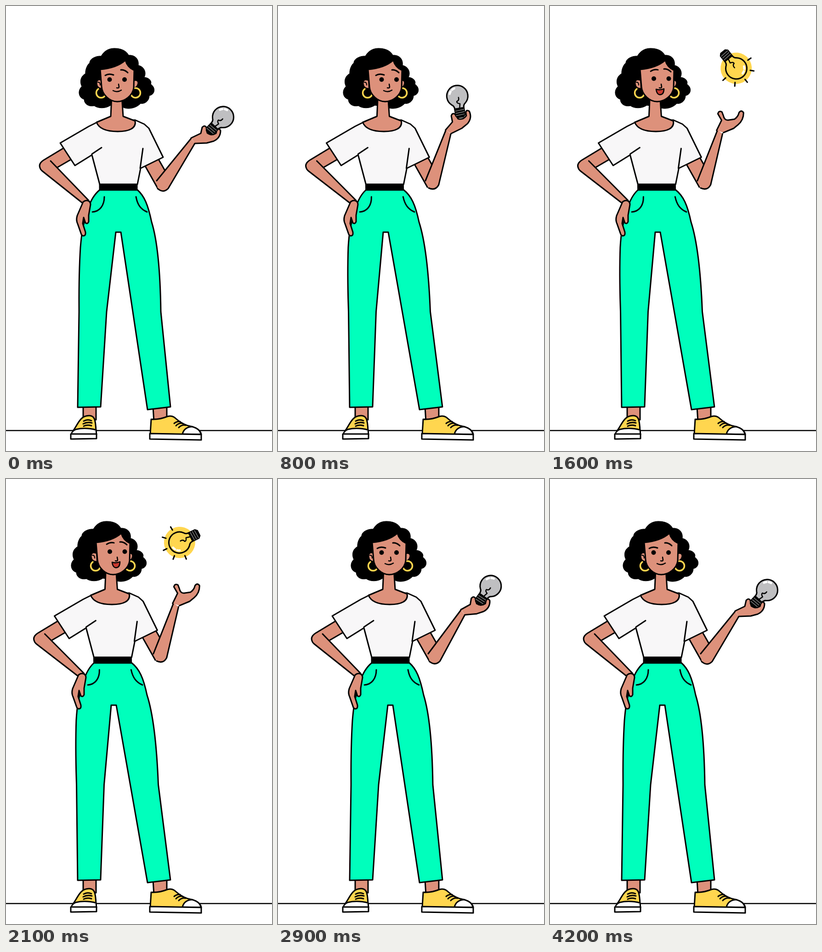
Animation, 579 px wide and 968 px high, one loop 4.3 s. Source, as an HTML page with a canvas:

```html
<!DOCTYPE html>
<html lang="en">
<head>
<meta charset="utf-8">
<title>Bulb toss</title>
<style>
html, body { margin: 0; width: 100%; height: 100%; overflow: hidden; background: #fff; }
canvas { display: block; width: 579px; height: 968px; }
</style>
</head>
<body>
<canvas id="stage" width="579" height="968"></canvas>
<script>
const ctx = document.getElementById('stage').getContext('2d');
const LOOP = 4300, STEP = 100;
const INK = '#000', SKIN = '#dd917b', GREEN = '#00ffbc', YELLOW = '#ffd64f',
      SHIRT = '#f8f7f8', GREY = '#bfbfc1', RED = '#c8392f';
const PEAK = 1800, HANG = 600;

const rad = deg => deg * Math.PI / 180;
const unit = (v, a, b) => Math.min(1, Math.max(0, (v - a) / (b - a)));
const smooth = (v, a, b) => { const u = unit(v, a, b); return u * u * (3 - 2 * u); };
const bump = (v, a, b) => Math.sin(Math.PI * unit(v, a, b));
// Quick start, long soft landing
const settle = (t, start) => 1 - (1 - unit(t, start, start + 1200) ** 2) ** 7;

// How far a height on the body sways and lifts; the feet stay put
const shift = y => 10 * unit(y, 875, 492) + 2.6 * smooth(y, 425, 395);
const lift = y => 6 * unit(y, 885, 690);

function pen(d, fill, line = INK, width = 3) {
  const path = new Path2D(d);
  if (fill) { ctx.fillStyle = fill; ctx.fill(path); }
  if (line) { ctx.strokeStyle = line; ctx.lineWidth = width; ctx.stroke(path); }
}
function at(x, y, deg, draw) {
  ctx.save();
  ctx.translate(x, y);
  ctx.rotate(rad(deg));
  draw();
  ctx.restore();
}
function arc(x, y, r, from, to, line, width) {
  ctx.beginPath();
  ctx.arc(x, y, r, rad(from), rad(to));
  ctx.strokeStyle = line;
  ctx.lineWidth = width;
  ctx.stroke();
}
function oval(x, y, rx, ry, fill) {
  ctx.beginPath();
  ctx.ellipse(x, y, rx, ry, 0, 0, 7);
  ctx.fillStyle = fill;
  ctx.fill();
}

function shoes() {
  pen('M0,923.5 L579,923.5', null, INK, 2.5);
  pen('M168,868 L168,900 L196,900 L196,868', SKIN);
  pen('M320,872 L322,905 L350,900 L350,870', SKIN);

  pen('M146,924 C156,912 160,891 181,891 C193,891 195,900 196,925', YELLOW);
  pen('M142,932 Q143,925 152,921 Q172,916 196,922 L197,932 Z', '#fff');
  pen('M141,931 L197,931 L197,941 L141,942 Z', '#fff');
  pen('M169,903 Q177,898 186,902 M168,909 Q177,904 187,907 M169,914 Q177,910 186,913');

  pen('M314,931 L316,899 Q334,900 351,893 Q361,890 368,896 Q385,912 405,915 Q424,922 425,932 Z', YELLOW);
  pen('M384,931 Q388,916 405,915 Q423,920 424,932 Z', '#fff');
  pen('M313,930 L425,932 L425,944 L313,942 Z', '#fff');
  pen('M366,908 Q372,903 379,904 M370,913 Q377,906 385,908 M376,917 Q383,910 391,912');
}

function bulb(lit) {
  if (lit) {
    oval(0, -37, 34, 34, YELLOW);
    for (let k = -2; k <= 2; k++) {
      at(0, -37, k * 43, () => pen('M0,-31 L0,-39'));
    }
  }
  pen('M-10,-10 Q-10,-17 -15,-20 A23,23 0 1 1 15,-20 Q10,-17 10,-10 Z', lit ? YELLOW : GREY);
  pen('M1,-11 L3,-20 Q-4,-22 -3,-26 Q3,-27 2,-34', null, INK, 2.5);
  for (const from of [202, 238]) arc(0, -38, 17, from, from + 19, '#fff', 4.5);
  pen('M-10,-10 L10,-10 L10,5 L6,9 L-6,9 L-10,5 Z', INK);
  for (const y of [-6, -1, 4]) pen(`M-9,${y + .5} L9,${y - .5}`, null, '#777', 1.7);
}

function hair(s, hop) {
  ctx.save();
  ctx.translate(241 - 17 * s, -10 * hop);
  ctx.scale(1 - .08 * Math.max(0, hop), 1);
  ctx.translate(-241, 0);
  pen('M207,109 C214,97 224,92 236,92 C250,92 262,97 267,107 C282,106 290,117 288,129 ' +
    'C302,132 306,146 301,155 C313,156 318,165 315,170 C327,178 324,193 312,195 ' +
    'C312,207 301,214 293,212 C283,223 264,226 254,220 L228,216 C216,224 200,223 192,217 ' +
    'C180,220 170,213 170,203 C158,200 155,184 165,175 C160,165 162,153 173,147 ' +
    'C172,138 178,126 182,124 C182,114 197,108 207,109 Z', INK, INK, 1);
  ctx.restore();
}

function face(s, hop, joy) {
  ctx.save();
  ctx.translate(0, -8 * hop);

  at(-12 * s, 0, 0, () => {
    pen('M208,161 Q197,157 197,169 Q198,180 209,180', SKIN);
    pen('M200,166 Q205,165 205,172', null, INK, 2);
    pen('M277,162 Q288,159 288,168 Q286,178 277,179', SKIN);
    arc(207, 189, 10.5, -45, 235, YELLOW, 3.5);
    arc(282, 189, 10.5, -100, 190, YELLOW, 3.5);
  });
  at(-9 * s, 0, 0, () => pen('M205,138 Q241,135 260,118 Q264,133 279,140 L278,178 ' +
    'C276,195 258,208 242,208 C226,208 209,193 208,175 Z', SKIN));

  const eye = 5 + 3 * Math.max(0, hop);
  for (const x of [225.5, 258]) oval(x + joy / 2, 160 - 2 * joy, 5, eye, INK);
  at(3 * joy - 3 * s * (1 - joy), -9 * joy, -6 * joy / 225,
    () => pen(`M216,151 Q224,146 ${234 - 2 * joy},${150 - 2 * joy}`));
  at(-2 * s, -2 * joy, 0, () => pen('M250,139 Q258,138 265,145'));
  at(-3 * s, 0, 0, () => {
    pen('M245,170 L246,176 Q246,179 241,178', null, INK, 2.5);
    if (joy) pen('M234,181 Q243,184 251,180 Q251,193 242,193 Q235,192 234,181 Z', RED, INK, 2.5);
    else pen('M233,184 Q242,189 251,183', null, INK, 2.5);
  });
  ctx.restore();
}

function bulbArm(a, hop, flying) {
  at(-6 * a, -4 * a - 6 * hop, 0, () => {
    pen('M330,330 L350,362 L341,390 L331,398 L300,343', SKIN, null);
    pen('M330,330 L346,358 M300,343 L331,398');
    at(341, 386, -17.5 * a, () => {
      pen('M-13,-6 L62,-98 L70,-87 L12,11 Q1,22 -11,11 Z', SKIN, null);
      pen('M-13,-6 L62,-98 M70,-87 L12,11 Q1,22 -11,11');
      at(66, -94, -7 * a, () => {
        if (flying) {
          at(0, 0, 24, () => pen('M-7,-2 L4,-24 L-4,-38 Q-2,-46 5,-42 L8,-34 Q10,-24 18,-24 L32,-26 ' +
            'Q40,-31 42,-40 Q47,-47 52,-40 Q52,-24 40,-14 L30,-6 L8,3', SKIN));
        } else {
          pen('M-4,-5 L17,-15 L20,-28 Q25,-34 29,-28 L31,-16 Q40,-9 50,-15 L52,-22 ' +
            'Q56,-28 60,-21 Q60,-5 45,2 L30,6 L4,7', SKIN);
          at(40, -23 - 3 * a, 43 - 28.5 * a, () => bulb(false));
        }
      });
    });
  });
}

function draw(t) {
  const hop = bump(t, 1100, 1600) - .4 * bump(t, 850, 1150);
  const s = smooth(t, 0, 600) - smooth(t, 2250, 2850) - .12 * hop;
  const a = settle(t, 0) - settle(t, 2300);
  const joy = t >= 1200 && t < 2700 ? 1 : 0;
  const flying = Math.abs(t - PEAK) < HANG;

  // Body paths bend with the sway and the hop
  const bend = d => d.replace(/(-?[\d.]+),(-?[\d.]+)/g,
    (_, x, y) => `${x - s * shift(+y)},${y - hop * lift(+y)}`);
  const body = (d, ...style) => pen(bend(d), ...style);

  ctx.fillStyle = '#fff';
  ctx.fillRect(0, 0, 579, 968);
  ctx.lineCap = ctx.lineJoin = 'round';

  shoes();
  hair(s, hop);

  body('M204,400 Q187,414 179,440 C167,475 164,500 162,525 C158,590 159,640 159,665 L156,873 L206,872 ' +
    'L219,665 L239,492 L250,492 L276,665 L308,878 L358,872 L337,665 ' +
    'C336,590 331,515 317,470 C309,432 301,413 286,400 Z', GREEN);
  body('M214,415 C214,434 204,447 188,448 M283,415 C286,432 293,442 307,448');

  // Arm on the hip
  body('M132,305 L84,334 Q70,342 74,352 Q75,356 79,359 L167,429 L180,423 L112,351 L143,333', SKIN, null);
  body('M132,305 L84,334 Q70,342 74,352 Q75,356 79,359 L167,429 M97,337 L180,423 M112,351 L143,333');

  bulbArm(a, hop, flying);

  // Shirt, neck, belt
  body('M198,253 L180,262 L118,298 L150,347 L187,324 L204,388 L286,388 L293,353 L342,329 L311,266 L301,257 L281,248 Z', SHIRT);
  body('M187,322 L208,308 M298,310 L292,353');
  body('M230,195 L228,240 L197,253 C203,268 222,273 243,273 C268,273 284,266 281,250 L255,240 L252,195', SKIN);
  body('M204,388 L285,388 L285,400 L204,400 Z', INK);

  // Hand on the hip
  body('M168,426 C176,420 184,424 184,432 L180,455 L180,469 Q178,475 173,472 L169,460 L167,473 ' +
    'L173,492 Q174,500 168,500 Q164,499 163,494 L156,474 Q152,466 155,456 Z', SKIN);

  face(s, hop, joy);

  if (flying) {
    const y = 118 + 111 * Math.abs((t - PEAK) / HANG) ** 3.2;
    at(394, y, 80 + (t - 1300) * .205, () => {
      ctx.translate(0, 19);
      bulb(true);
    });
  }
}

function tick() {
  draw(Math.floor(performance.now() % LOOP / STEP) * STEP);
  requestAnimationFrame(tick);
}
tick();
</script>
</body>
</html>
```
